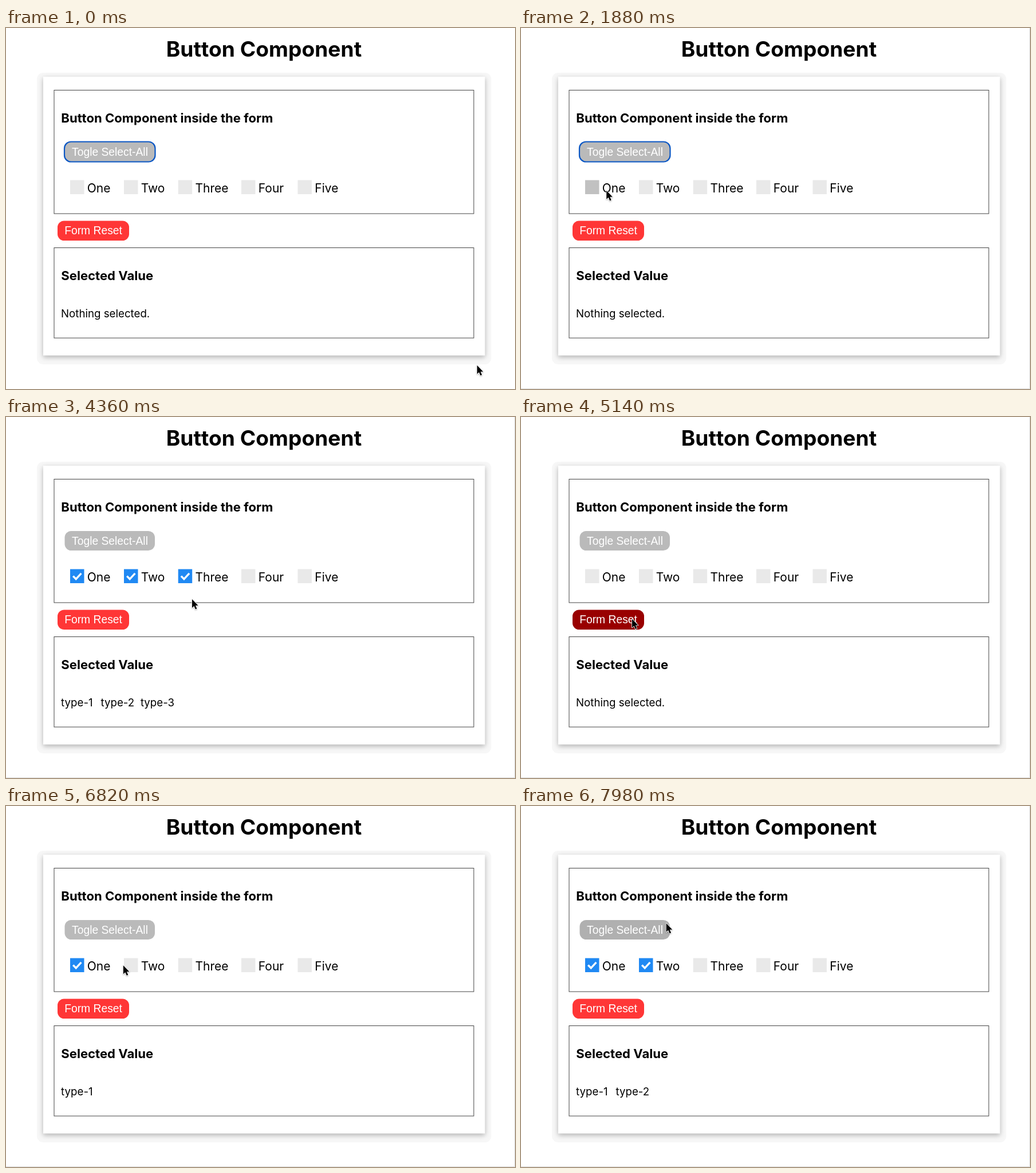
These frames come from a looping animation (889x630 px, 8 s). An HTML page:

```html
<!DOCTYPE html>
<html lang="en">
<head>
<meta charset="utf-8">
<title>Button Component</title>
<style>
  html, body { margin: 0; width: 100%; height: 100%; overflow: hidden; background: #fff; }
  svg { display: block; width: 889px; height: 630px; font-family: Inter, "Open Sans", sans-serif; }
  .title { font-size: 37.2px; font-weight: 700; text-anchor: middle; }
  .head { font-size: 22.1px; font-weight: 700; }
  .label { font-size: 21px; }
  .value { font-size: 18.7px; }
  .btn { font: 19.3px "Liberation Sans", Arial, sans-serif; fill: #fff; text-anchor: middle; }
  .panel { fill: none; stroke: #444; }
  .card { filter: drop-shadow(0 3px 4px rgba(0, 0, 0, .28)); }
  .tick { fill: none; stroke: #fff; stroke-width: 3.4; }
  #cursor { filter: drop-shadow(0 1px 1px rgba(0, 0, 0, .3)); }
</style>
</head>
<body>
<svg viewBox="0 0 889 630">
  <path id="edge" d="M0 629.5H888.5V0" fill="none" stroke="#dcdcdc"/>
  <text class="title" x="450.5" y="49.5">Button Component</text>

  <rect x="54" y="78" width="793.5" height="509" rx="11" fill="#f7f7f7"/>
  <rect class="card" x="65" y="85" width="771.5" height="486.5" fill="#fff"/>
  <rect class="panel" x="84" y="108.5" width="733" height="215.5"/>
  <rect class="panel" x="84" y="383.5" width="733" height="157.5"/>

  <text class="head" x="96.3" y="165">Button Component inside the form</text>
  <rect id="toggle" x="102.5" y="199" width="157.5" height="34" rx="11.5"/>
  <rect id="ring" x="102" y="198.5" width="158.5" height="35" rx="11.5" fill="none" stroke="#0b57c4" stroke-width="2.2"/>
  <text class="btn" x="181.5" y="222.5">Togle Select-All</text>

  <g id="options"></g>

  <rect id="reset" x="90" y="336.5" width="125" height="34.5" rx="11.5"/>
  <text class="btn" x="152.5" y="360">Form Reset</text>

  <text class="head" x="96.3" y="440">Selected Value</text>
  <text class="value" id="empty" x="96" y="505.2">Nothing selected.</text>
  <g id="values"></g>

  <path id="cursor" d="M0 0V15L3.4 12L5.9 17.6L8.4 16.5L6 11H10.6Z"
        fill="#000" stroke="#fff" stroke-width="1.6" paint-order="stroke" stroke-linejoin="round"/>
</svg>
<script>
const LOOP = 8000;
const START = { x: 822.8, y: 588.8 };
const $ = id => document.getElementById(id);

// Each pointer move eases from the previous stop
const MOVES = [
  { from: 300, to: 1820, x: 149.3, y: 283.8 },
  { from: 2200, to: 2760, x: 253.5, y: 286 },
  { from: 3080, to: 3720, x: 343, y: 283 },
  { from: 3920, to: 4360, x: 325, y: 318 },
  { from: 4400, to: 5080, x: 194, y: 352.5 },
  { from: 5540, to: 6360, x: 147, y: 284 },
  { from: 6600, to: 7000, x: 247, y: 274 },
  { from: 7460, to: 7980, x: 253.7, y: 204.8 }
];

// Each click sets how many options are selected
const CLICKS = [
  { at: 0, count: 0 }, { at: 1940, count: 1 }, { at: 2740, count: 2 }, { at: 3800, count: 3 },
  { at: 5080, count: 0 }, { at: 6520, count: 1 }, { at: 7220, count: 2 }
];

const OPTIONS = { One: 112, Two: 206, Three: 300.7, Four: 411, Five: 509.5 };

function add(parent, tag, attrs, text = "") {
  const el = document.createElementNS("http://www.w3.org/2000/svg", tag);
  for (const key in attrs) el.setAttribute(key, attrs[key]);
  el.textContent = text;
  return parent.appendChild(el);
}

const options = Object.entries(OPTIONS).map(([name, x]) => ({
  x,
  box: add($("options"), "rect", { x, y: 265.5, width: 24.5, height: 24.5 }),
  tick: add($("options"), "path", { class: "tick", d: `M${x + 5.2} 277.6l5 5.2l9.2 -10` }),
  label: add($("options"), "text", { class: "label", x: x + 29.8, y: 287 }, name)
}));
const values = [1, 2, 3].map(n =>
  add($("values"), "text", { class: "value", x: 26.7 + 69.4 * n, y: 505.2 }, `type-${n}`));

const show = (el, on) => el.setAttribute("visibility", on ? "visible" : "hidden");
const ease = s => s * s * (3 - 2 * s);

function pointer(t) {
  let { x, y } = START;
  for (const m of MOVES) {
    const k = ease(Math.min(1, Math.max(0, (t - m.from) / (m.to - m.from))));
    x += (m.x - x) * k;
    y += (m.y - y) * k;
  }
  return { x, y };
}

function draw(t) {
  const { x, y } = pointer(t);
  const over = (left, top, width, height) =>
    x >= left && x <= left + width && y >= top && y <= top + height;
  const count = CLICKS.findLast(c => c.at <= t).count;

  options.forEach((o, i) => {
    const on = i < count;
    const hover = over(o.x, 264, 72, 29);
    o.box.setAttribute("fill", on ? "#2089f3" : hover ? "#c1c1c1" : "#e9e9e9");
    show(o.tick, on);
  });
  values.forEach((v, i) => show(v, i < count));
  show($("empty"), count === 0);
  show($("ring"), t < CLICKS[1].at);
  show($("edge"), t >= 840);
  $("toggle").setAttribute("fill", over(102, 199, 158, 34) ? "#b0b0b0" : "#bababa");
  $("reset").setAttribute("fill", over(90, 337, 125, 34) ? "#990000" : "#ff3636");
  $("cursor").setAttribute("transform", `translate(${x.toFixed(2)} ${y.toFixed(2)})`);
}

function tick() {
  draw(performance.now() % LOOP);
  requestAnimationFrame(tick);
}
tick();
</script>
</body>
</html>
```
